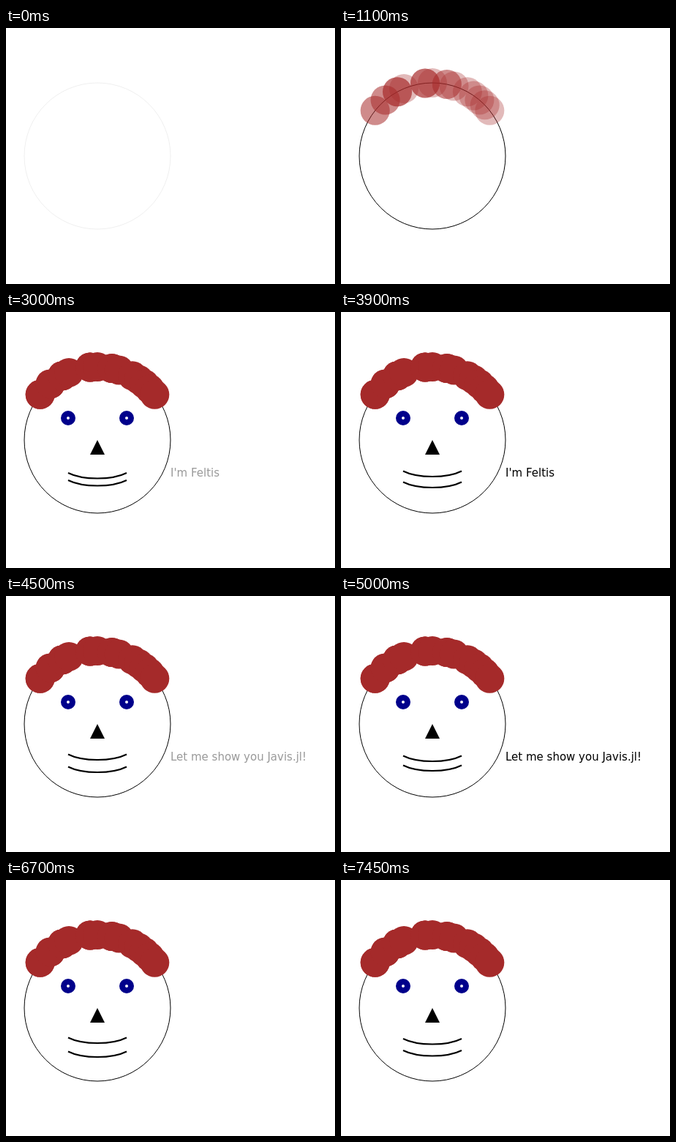
Animation of 450x350 px, one loop 7500 ms. Source, as an HTML page with a canvas:

```html
<!DOCTYPE html>
<html lang="en">
<head>
<meta charset="utf-8">
<title>Talking face</title>
<style>
  html, body { margin: 0; width: 100%; height: 100%; overflow: hidden; background: #fff; }
  canvas { display: block; }
</style>
</head>
<body>
<canvas id="stage" width="450" height="350"></canvas>
<script>
const ctx = document.getElementById('stage').getContext('2d');
const TAU = 2 * Math.PI;
const STEP = 50, STEPS = 150;

// Hair positions in radians from the top of the head; repeats overlap
const hair = [-.9, -.9, -.7, -.7, -.5, -.5, -.5, -.4, -.1, -.1, -.1, 0,
              .2, .2, .3, .5, .6, .7, .8, .9];

// Opacity of a fade lasting n steps, already visible on its first step
const fade = (i, first, n) => Math.min(1, Math.max(0, (i - first + 1) / n));

function circle(x, y, r) {
  ctx.beginPath();
  ctx.arc(x, y, r, 0, TAU);
}

function lip(y) {
  ctx.beginPath();
  ctx.moveTo(-40, y);
  ctx.bezierCurveTo(-20, y + 10, 20, y + 10, 40, y);
  ctx.stroke();
}

function drawFace(i) {
  ctx.globalAlpha = fade(i, 0, 15);
  ctx.strokeStyle = '#000';
  ctx.lineWidth = 1;
  circle(0, 0, 100);
  ctx.stroke();

  ctx.globalAlpha = fade(i, 15, 25);
  ctx.fillStyle = 'brown';
  for (const a of hair) {
    circle(100 * Math.sin(a), -100 * Math.cos(a), 20);
    ctx.fill();
  }

  ctx.globalAlpha = fade(i, 29, 15);
  ctx.strokeStyle = 'darkblue';
  ctx.lineWidth = 8;
  for (const x of [-40, 40]) {
    circle(x, -30, 6);
    ctx.stroke();
  }
  ctx.fillStyle = '#000';
  ctx.beginPath();
  ctx.moveTo(0, 0);
  ctx.lineTo(-10, 20);
  ctx.lineTo(10, 20);
  ctx.fill();

  // The lips part by 5 px and close again every 20 steps
  const phase = Math.max(0, i - 63) % 20;
  const open = (10 - Math.abs(phase - 10)) / 2;
  ctx.globalAlpha = fade(i, 45, 15);
  ctx.strokeStyle = '#000';
  ctx.lineWidth = 2;
  lip(45 - open);
  lip(55 + open);
}

function say(text, i, start, end) {
  ctx.globalAlpha = fade(i, start, 5) * (1 - fade(i, end, 5));
  ctx.fillText(text, 225, 225);
}

function draw(i) {
  ctx.globalAlpha = 1;
  ctx.fillStyle = '#fff';
  ctx.fillRect(0, 0, 450, 350);
  ctx.save();
  ctx.translate(125, 175);
  drawFace(i);
  ctx.restore();
  ctx.fillStyle = '#000';
  ctx.font = '15px "DejaVu Sans", sans-serif';
  say("I'm Feltis", i, 59, 84);
  say('Let me show you Javis.jl!', i, 89, 110);
}

let start;
function tick(now) {
  start ??= now;
  draw(Math.floor((now - start) / STEP) % STEPS);
  requestAnimationFrame(tick);
}
draw(0);
requestAnimationFrame(tick);
</script>
</body>
</html>
```
